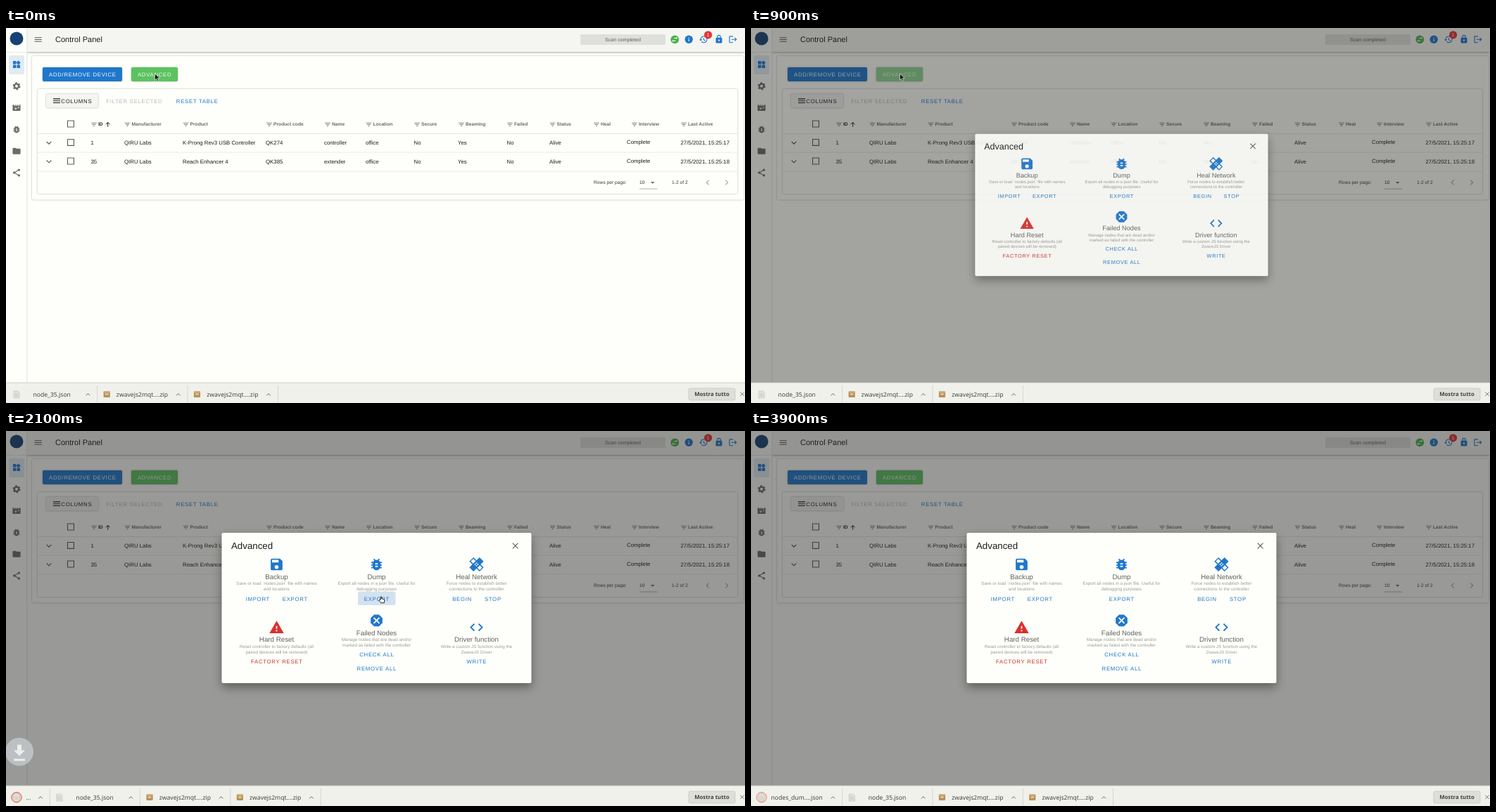
These frames come from a looping animation (1050x534 px, 4000 ms). An HTML page:

```html
<!DOCTYPE html>
<html lang="en">
<head>
<meta charset="utf-8">
<title>Control Panel</title>
<style>
  html, body { margin: 0; width: 100%; height: 100%; overflow: hidden; background: #fefffa; }
  svg { display: block; width: 1050px; height: 534px; font-family: "Liberation Sans", Arial, sans-serif; text-rendering: geometricPrecision; }
  .card { filter: drop-shadow(0 .8px 1px rgba(0,0,0,.32)); }
  .bar { filter: drop-shadow(0 1.4px 1.6px rgba(0,0,0,.34)); }
  .modal { filter: drop-shadow(0 6px 7px rgba(0,0,0,.38)); }
  .caps { letter-spacing: .698px; }
  .mid { text-anchor: middle; }
  .shelf { font-family: "Noto Sans", "Open Sans", sans-serif; }
</style>
</head>
<body>
<svg id="stage" viewBox="0 0 1050 534"></svg>
<script>
const PAPER = '#fefffa', BLUE = '#1f77cc', GREY = '#6b6b69', INK = '#1d1d1c', LINE = '#e0e0dc', RED = '#da3030';
const ITEM_WIDTH = 128.3;

// Icons live on a 24 unit grid; C marks the main colour, P the paper colour.
const path = d => `<path d="${d}" fill="C"/>`;
const line = (d, width = 2) => `<path d="${d}" fill="none" stroke="C" stroke-width="${width}"/>`;
const dot = (x, y, r, fill = 'C') => `<circle cx="${x}" cy="${y}" r="${r}" fill="${fill}"/>`;
const ICONS = {
  menu: path('M3 6h18v2H3zM3 11h18v2H3zM3 16h18v2H3z'),
  widgets: path('M13 13v8h8v-8zM3 21h8v-8H3zM3 3v8h8V3zM16.7 1.7L11 7.3l5.7 5.7 5.6-5.7z'),
  gear: '<circle cx="12" cy="12" r="5.5" fill="none" stroke="C" stroke-width="4"/>' +
    '<circle cx="12" cy="12" r="8.4" fill="none" stroke="C" stroke-width="3" stroke-dasharray="4.8 4"/>',
  movie: path('M18 4l2 3h-3l-2-3h-2l2 3h-3l-2-3H8l2 3H7L5 4H4c-1.1 0-2 .9-2 2v12c0 1.1.9 2 2 2h16c1.1 0 2-.9 2-2V4z') +
    '<path d="M10 10l1 3 3 1-3 1-1 3-1-3-3-1 3-1zM17 9l.7 1.7 1.7.7-1.7.7L17 14l-.7-1.9-1.7-.7 1.7-.7z" fill="P"/>',
  bug: path('M20 8h-2.8c-.5-.8-1.1-1.5-1.8-2L17 4.4 15.6 3l-2.2 2.2a6 6 0 0 0-2.8 0L8.4 3 7 4.4 8.6 6c-.7.5-1.3 1.2-1.8 2H4v2h2.1L6 12H4v2h2l.1 2H4v2h2.8a6 6 0 0 0 10.4 0H20v-2h-2.1l.1-2h2v-2h-2l-.1-2H20zm-6 8h-4v-2h4zm0-4h-4v-2h4z'),
  folder: path('M10 4H4c-1.1 0-2 .9-2 2v12c0 1.1.9 2 2 2h16c1.1 0 2-.9 2-2V8c0-1.1-.9-2-2-2h-8z'),
  share: line('M18 5L6 12l12 7') + dot(18, 5, 3) + dot(6, 12, 3) + dot(18, 19, 3),
  swap: dot(12, 12, 10.5) + '<path d="M8 12.5L5 15.5l3 3v-2.2h6v-1.8H8zM19 8.5l-3-3v2.2h-6v1.8h6v2z" fill="P"/>',
  info: dot(12, 12, 10.2) + '<path d="M11 7h2v2h-2zM11 11h2v6h-2z" fill="P"/>',
  history: line('M5 12a8 8 0 1 1 2.4 5.7M12.7 8v4.7l4 2.3') + path('M1 12h8l-4 4z'),
  lock: path('M6 8h12a2 2 0 0 1 2 2v10a2 2 0 0 1-2 2H6a2 2 0 0 1-2-2V10a2 2 0 0 1 2-2z') +
    line('M8 9V6a4 4 0 0 1 8 0v3') + dot(12, 15, 2, 'P'),
  logout: path('M17 7l-1.4 1.4 2.6 2.6H8v2h10.2l-2.6 2.6L17 17l5-5zM4 5h8V3H4a2 2 0 0 0-2 2v14a2 2 0 0 0 2 2h8v-2H4z'),
  filter: path('M10 18h4v-2h-4zM3 6v2h18V6zM6 13h12v-2H6z'),
  sort: line('M12 20V5M5 12l7-7 7 7', 2.4),
  down: line('M6 9l6 6 6-6'),
  up: line('M6 15l6-6 6 6'),
  left: line('M15 6l-6 6 6 6'),
  right: line('M9 6l6 6-6 6'),
  triangle: path('M7 10l5 5 5-5z'),
  box: line('M4 4h16v16H4z'),
  close: line('M5 5l14 14M19 5L5 19'),
  save: path('M17 3H5a2 2 0 0 0-2 2v14a2 2 0 0 0 2 2h14a2 2 0 0 0 2-2V7z') + dot(12, 16, 3, 'P') + '<path d="M5 5h10v4H5z" fill="P"/>',
  heal: '<g transform="rotate(45 12 12)"><path d="M1.4 8h21.2v8H1.4zM8 1.4h8v21.2H8z" fill="C" stroke="C" stroke-linejoin="round"/>' +
    '<path d="M2.5 9.3h5v5.4h-5zM16.5 9.3h5v5.4h-5z" fill="P"/></g>' +
    dot(12, 10, 1, 'P') + dot(14, 12, 1, 'P') + dot(12, 14, 1, 'P') + dot(10, 12, 1, 'P'),
  warning: path('M1 21h22L12 2z') + '<path d="M11 10h2v4h-2zM11 16h2v2h-2z" fill="P"/>',
  octagon: path('M8.3 3L3 8.3v7.4L8.3 21h7.4l5.3-5.3V8.3L15.7 3z') + '<path d="M7.7 7.7l8.6 8.6M16.3 7.7l-8.6 8.6" stroke="P" stroke-width="2"/>',
  code: line('M8.7 6.7L3.4 12l5.3 5.3M15.3 6.7l5.3 5.3-5.3 5.3'),
};

const icon = (name, x, y, color = GREY, size = 13.4) =>
  `<g transform="translate(${x - size / 2} ${y - size / 2}) scale(${size / 24})">` +
  ICONS[name].replaceAll('"C"', `"${color}"`).replaceAll('"P"', `"${PAPER}"`) + '</g>';
// y is the middle of the capital letters
const text = (x, y, string, size = 7.82, fill = INK, attrs = '') =>
  `<text x="${x}" y="${y + size * .36}" font-size="${size}" fill="${fill}" ${attrs}>${string}</text>`;
const caps = (x, y, string, fill) => text(x + .35, y, string, 7.82, fill, 'class="caps mid"');
const rect = (x, y, width, height, fill, attrs = '') =>
  `<rect x="${x}" y="${y}" width="${width}" height="${height}" fill="${fill}" ${attrs}/>`;

function sidebar() {
  const names = ['widgets', 'gear', 'movie', 'bug', 'folder', 'share'];
  return rect(0, 0, 30, 505, PAPER) + rect(29.5, 0, .8, 505, '#d9d9d5') + rect(0, 34, 30, .7, LINE) +
    dot(15, 15, 9.5, '#174272') + rect(4, 39, 22, 27, '#e2ebf2', 'rx="2"') +
    names.map((name, i) => icon(name, 15, 52 + i * 30.8, i ? GREY : BLUE)).join('');
}

function header() {
  return rect(30, 0, 1020, 34, '#f5f6f1', 'class="bar"') + icon('menu', 45.7, 16.5, '#5c5c5a') +
    text(70, 16.5, 'Control Panel', 11.05) + rect(816, 9, 121, 15, '#dfe0db', 'rx="1.5"') +
    text(876.5, 16.8, 'Scan completed', 7.1, '#5f5f5d', 'class="mid"') +
    icon('swap', 950.3, 16.3, '#4caf50') + icon('info', 970.2, 16.3, BLUE) + icon('history', 991, 16.3, BLUE) +
    icon('lock', 1013, 16, BLUE) + icon('logout', 1033, 16.3, BLUE) +
    dot(997.6, 9.8, 5.6, '#e53535') + text(997.6, 9.9, '1', 6.7, '#fff', 'class="mid"');
}

function table() {
  const columns = [[131, 'ID'], [178.5, 'Manufacturer'], [261.5, 'Product'], [380, 'Product code'], [463, 'Name'],
    [521.5, 'Location'], [590, 'Secure'], [653, 'Beaming'], [722, 'Failed'], [782.5, 'Status'], [845, 'Heal'],
    [899, 'Interview'], [969, 'Last Active']];
  const cellX = [120.5, 168, 251, 369, 452, 511, 579.5, 642, 711.5, 772, 834, 882, 958.5];
  const rows = [
    ['1', 'QIRU Labs', 'K-Prong Rev3 USB Controller', 'QK274', 'controller', 'office', 'No', 'Yes', 'No', 'Alive', '', 'Complete', '27/5/2021, 15:25:17'],
    ['35', 'QIRU Labs', 'Reach Enhancer 4', 'QK385', 'extender', 'office', 'No', 'Yes', 'No', 'Alive', '', 'Complete', '27/5/2021, 15:25:18'],
  ];
  const head = columns.map(([x, name], i) => icon('filter', x - 6, 137.3, GREY, 10.4) +
    text(x, 137, name, 6.7, i ? GREY : INK, 'font-weight="bold"')).join('');
  const body = rows.map((cells, r) => {
    const y = 163.5 + r * 26.6;
    return icon('down', 61, y, '#4c4c4b') + icon('box', 92, y - .6, '#5c5c5a') +
      cells.map((cell, i) => text(cellX[i], y - (i === 11), cell)).join('');
  }).join('');
  return head + icon('sort', 144.7, 137.3, INK, 10) + icon('box', 92, 136.5, '#5c5c5a') + body +
    [150, 176.7, 203.7].map(y => rect(45, y, 994, .7, LINE)).join('') +
    text(835, 220, 'Rows per page:', 6.7, '#3c3c3b') + text(900, 220, '10', 6.7, '#2c2c2b') +
    icon('triangle', 918.7, 220, GREY) + rect(900, 228.7, 25.5, .7, '#8f8f8c') +
    text(946, 220, '1-2 of 2', 6.7, '#3c3c3b') + icon('left', 997, 220, '#a5a5a2') + icon('right', 1024, 220, '#a5a5a2');
}

function page() {
  return rect(0, 0, 1050, 505, PAPER) + rect(37, 40, 1011, 204.5, PAPER, 'rx="2" class="card"') +
    rect(45, 87, 994, 149, PAPER, 'rx="2" class="card"') +
    rect(52, 56, 113, 20, BLUE, 'rx="2" class="card"') + caps(108.5, 66.2, 'ADD/REMOVE DEVICE', '#f4f8fb') +
    rect(178, 56, 66, 20, '#5cc25f', 'rx="2" class="card"') + caps(210.8, 66.2, 'ADVANCED', '#eefaee') +
    '<clipPath id="advancedClip"><rect x="178" y="56" width="66" height="20" rx="2"/></clipPath>' +
    '<circle id="advancedRipple" cx="211" cy="66" fill="#fff" clip-path="url(#advancedClip)"/>' +
    rect(57, 94, 74, 19.5, '#f4f5f0', 'rx="2" class="card"') + icon('menu', 72, 103.7, INK) + caps(100, 103.7, 'COLUMNS', INK) +
    caps(182, 103.7, 'FILTER SELECTED', '#b9bab6') + caps(271.4, 103.7, 'RESET TABLE', BLUE) +
    table() + header() + sidebar();
}

function dialog() {
  const cell = (x, y, name, title, lines, buttons, color = BLUE) => icon(name, x, y, color, 22.3) +
    text(x, y + 17.2, title, 9.75, '#616160', 'class="mid"') +
    lines.map((s, i) => text(x, y + 27 + i * 7.7, s, 6.28, '#9b9b99', 'class="mid"')).join('') +
    buttons.map(([label, bx, by]) => caps(bx, by, label, color === RED ? '#c83434' : color)).join('');
  return rect(306.5, 145, 440, 214, PAPER, 'rx="2" class="modal"') + text(320, 163.6, 'Advanced', 13.3) +
    icon('close', 723.7, 163.5, '#5c5c5a') +
    rect(500, 228.5, 53.5, 19.5, '#e8eef1', 'rx="2" id="exportHover"') +
    rect(671, 228.7, 41.5, 19.3, '#e8eef1', 'rx="2" id="stopHover"') +
    '<clipPath id="exportClip"><rect x="500" y="228.5" width="53.5" height="19.5" rx="2"/></clipPath>' +
    `<circle id="exportRipple" cx="531" cy="238" fill="${BLUE}" clip-path="url(#exportClip)"/>` +
    cell(384.5, 190, 'save', 'Backup', ['Save or load `nodes.json` file with names', 'and locations'],
      [['IMPORT', 357.5, 238.7], ['EXPORT', 410.5, 238.7]]) +
    cell(526.5, 190, 'bug', 'Dump', ['Export all nodes in a json file. Useful for', 'debugging purposes'], [['EXPORT', 526.5, 238.7]]) +
    cell(668.5, 190, 'heal', 'Heal Network', ['Force nodes to establish better', 'connections to the controller'],
      [['BEGIN', 647.7, 238.7], ['STOP', 691.5, 238.7]]) +
    cell(384.5, 279.6, 'warning', 'Hard Reset', ['Reset controller to factory defaults (all', 'paired devices will be removed)'],
      [['FACTORY RESET', 384.5, 328.3]], RED) +
    cell(526.5, 269.8, 'octagon', 'Failed Nodes', ['Manage nodes that are dead and/or', 'marked as failed with the controller'],
      [['CHECK ALL', 526.5, 318.4], ['REMOVE ALL', 526.5, 338.3]]) +
    cell(668.5, 279.6, 'code', 'Driver function', ['Write a custom JS function using the', 'ZwaveJS Driver'], [['WRITE', 668.5, 328.3]]);
}

function shelf() {
  const fileIcon = '<path d="M11 517h6l2 2v8h-8z" fill="#e3e3df" stroke="#b9b9b5" stroke-width=".6"/><path d="M12.5 520.5h4M12.5 522.5h5M12.5 524.5h5" stroke="#bcbcb8" stroke-width=".7"/>';
  const zipIcon = rect(10.3, 517.3, 9.2, 8.8, '#b8925a', 'rx="1"') + rect(10.3, 517.3, 9.2, 2.2, '#d0b07e', 'rx="1"') + rect(12.8, 520.7, 4.2, 1.6, '#efe3cd');
  const label = (name, attrs) => text(65.2, 522, name, 8.6, '#45453f', attrs);
  const tail = icon('up', 116.5, 522, '#5a5a57', 11) + rect(129.3, 509, .8, 25, '#d0d0cb');
  const items = [[fileIcon, 'node_35.json'], [zipIcon, 'zwavejs2mqt....zip'], [zipIcon, 'zwavejs2mqt....zip']];
  return rect(0, 505, 1050, 29, '#f1f1ec') + rect(0, 504.7, 1050, .8, '#c6c6c1') +
    '<g class="shelf"><g id="newItem"><clipPath id="newClip"><rect id="newWidth" y="505" height="29"/></clipPath><g clip-path="url(#newClip)">' +
    '<circle id="ring" cx="15" cy="521.6" r="7.2" fill="#e0683f" fill-opacity=".25" stroke="#d8532f"/>' + fileIcon +
    text(28.5, 522, '', 8.6, '#45453f', 'id="newName"') + `</g><g id="newTail">${tail}</g></g><g id="items">` +
    items.map(([image, name], i) => `<g transform="translate(${i * ITEM_WIDTH})">${image}${label(name, 'class="mid"')}${tail}</g>`).join('') +
    '</g>' + rect(970, 513, 66, 17, '#dfdfda', 'rx="2" stroke="#c4c4bf" stroke-width=".7"') +
    text(1003, 521.6, 'Mostra tutto', 7.8, '#43433f', 'class="mid" font-weight="600"') + '</g>' + icon('close', 1046, 521.3, '#5a5a57', 9.4);
}

const downloadBadge = '<g id="badge"><circle cx="19" cy="484" r="20" fill="#c3c8cc"/>' +
  '<path d="M16 474h6v8h5l-8 8-8-8h5zM11 494h16v3H11z" fill="#fff"/></g>';
const cursors = '<g id="arrow"><path d="M.5 0v9.2l2.2-2 1.5 3.6 1.6-.7-1.5-3.5h3z" fill="#111" stroke="#fff" stroke-width=".6"/></g>' +
  '<g id="hand"><path d="M2.6 5.3V1.2q.8-1 1.5 0v2.6l3.5.8q.9.3.8 1.3l-.6 3.8H3.2L.5 6.3q.2-1.2 1.2-.7z" fill="#fff" stroke="#111" stroke-width=".9"/></g>';

document.getElementById('stage').innerHTML = page() + rect(0, 0, 1050, 505, '#212121', 'id="overlay"') +
  `<g id="dialog">${dialog()}</g>` + downloadBadge + shelf() + cursors;

const el = id => document.getElementById(id);
const set = (id, attrs) => { for (const name in attrs) el(id).setAttribute(name, attrs[name]); };
const clamp = value => Math.max(0, Math.min(1, value));
const easeOut = (value, power) => 1 - (1 - clamp(value)) ** power;

// time, x, y, pointing hand
const POINTER = [[0, 211, 65], [500, 211, 65, true], [800, 211, 65], [1100, 330, 137], [1200, 439, 202], [1400, 486, 222],
  [1500, 529.5, 235, true], [2400, 606, 239], [2500, 678.5, 241, true], [2700, 600, 340], [2800, 500, 450], [2900, -20, -20]];

function ripple(id, age, strength) {
  set(id, { r: 43 * easeOut(age / 300, 5), opacity: age < 0 ? 0 : strength * clamp((450 - age) / 250) });
}

function draw(t) {
  const open = easeOut((t - 767) / 300, 3.8);
  set('overlay', { opacity: .46 * open });
  set('dialog', { opacity: open, transform: `translate(526.5 252) scale(${.5 + .5 * open}) translate(-526.5 -252)` });
  ripple('advancedRipple', t - 740, .3);
  ripple('exportRipple', t - 1780, .2);
  set('exportHover', { opacity: +(t >= 1500 && t < 2400) });
  set('stopHover', { opacity: +(t >= 2500 && t < 2700) });

  const fall = clamp((t - 1920) / 600);
  set('badge', { opacity: 1 - (2 * fall - 1) ** 2, transform: `translate(0 ${-39 * (1 - fall)})` });

  const width = ITEM_WIDTH * easeOut((t - 1880) / 800, 2);
  const name = 'nodes_dum....json';
  const room = Math.floor((width - 55) / 72.5 * name.length);
  set('items', { transform: `translate(${width})` });
  set('newItem', { opacity: +(width > 0) });
  set('newTail', { transform: `translate(${width - ITEM_WIDTH})` });
  set('newWidth', { width });
  el('newName').textContent = room >= name.length ? name : name.slice(0, Math.max(0, room - 2)) + '...';
  set('ring', { opacity: t < 2100 ? 0 : .5 + .5 * Math.cos((t - 2100) / 500 * Math.PI) });

  const [, x, y, hand] = POINTER.findLast(([time]) => time <= t);
  set('arrow', { transform: `translate(${x} ${y})`, opacity: hand ? 0 : 1 });
  set('hand', { transform: `translate(${x} ${y})`, opacity: hand ? 1 : 0 });
}

const start = performance.now();
function tick() {
  const elapsed = (performance.now() - start) % 4000;
  draw(Math.floor(elapsed / 100) * 100);
  requestAnimationFrame(tick);
}
tick();
</script>
</body>
</html>
```
